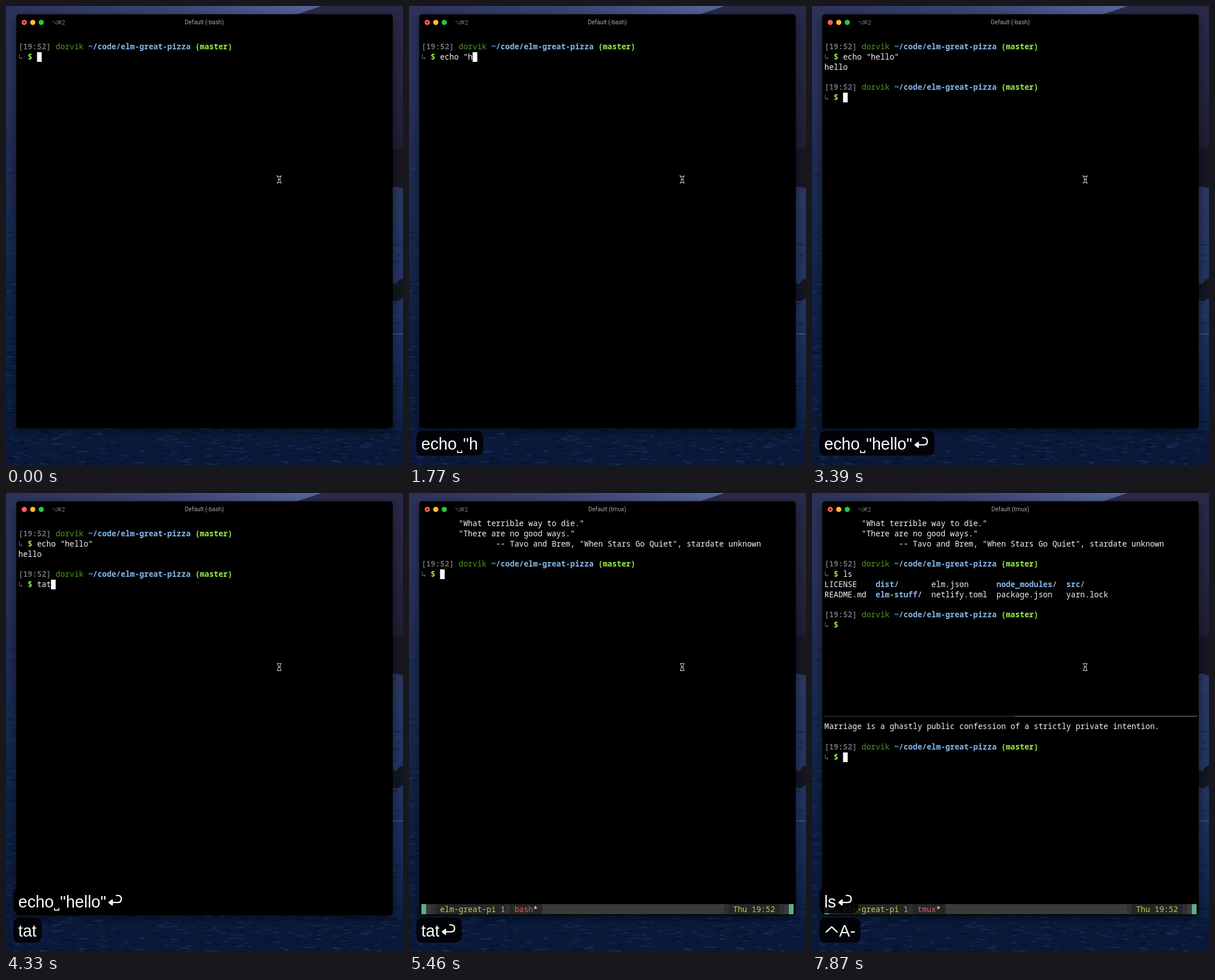
An HTML page with a canvas for the animation above (8 s loop, 696x805 px).

```html
<!DOCTYPE html>
<html lang="en">
<head>
<meta charset="utf-8">
<title>Terminal session</title>
<style>
html, body { margin: 0; width: 100%; height: 100%; overflow: hidden; background: #0a1734; }
canvas { display: block; }
</style>
</head>
<body>
<canvas id="stage" width="696" height="805"></canvas>
<script>
const W = 696, H = 805, LOOP = 8000;
const COL = 8.155, ROW = 17.8, LEFT = 21.8, TOP = 53.5;
const MONO = '"Noto Sans Mono", "DejaVu Sans Mono", monospace';
const KEY_FONT = '28.7px "Liberation Sans", Arial, sans-serif';
const WHITE = '#f4f4f4', GREY = '#6c6c6c', BLUE = '#86b8ea', LIME = '#9aee4a',
      GREEN = '#4e9a1c', YELLOW = '#c9c955', TEAL = '#5faf87';
const ctx = document.getElementById('stage').getContext('2d');

// Key presses, one list per bubble: [time, key]
const keys = [
  [[540, 'e'], [860, 'c'], [980, 'h'], [1090, 'o'], [1210, ' '], [1420, '"'], [1770, 'h'],
   [1890, 'e'], [2000, 'l'], [2120, 'l'], [2360, 'o'], [2590, '"'], [2950, '⏎']],
  [[3740, 't'], [3850, 'a'], [3970, 't'], [4450, '⏎']],
  [[5940, 'l'], [6060, 's'], [6180, '⏎']],
  [[7130, '⌃'], [7130, 'A'], [7480, '-']]
];
const fadeStart = [4740, 6290, Infinity, Infinity];

const typed = (i, t) => keys[i].filter(k => k[0] <= t).map(k => k[1]).join('');
const command = (i, t) => typed(i, t).replace('⏎', '');

function shape(c, points, fill) {
  c.beginPath();
  points.forEach(p => c.lineTo(...p));
  c.closePath();
  c.fillStyle = fill;
  c.fill();
}

function gradient(c, x0, y0, x1, y1, colors) {
  const g = c.createLinearGradient(x0, y0, x1, y1);
  colors.forEach((color, i) => g.addColorStop(i / (colors.length - 1), color));
  return g;
}

function paintDesktop() {
  const layer = document.createElement('canvas');
  layer.width = W;
  layer.height = H;
  const c = layer.getContext('2d');
  let seed = 7;
  const rand = () => (seed = seed * 16807 % 2147483647) / 2147483647;

  c.fillStyle = gradient(c, 0, 0, 0, H,
    ['#2c3259', '#2a315a', '#1e2b54', '#17274e', '#102144', '#0c1c3e', '#0a1838']);
  c.fillRect(0, 0, W, H);
  c.fillStyle = gradient(c, 0, 0, 540, 0, ['#2c3259', '#3a4470', '#56639a']);
  c.fillRect(0, 0, 560, 20);
  c.fillStyle = gradient(c, 0, 300, 0, 745, ['#2b3860', '#263561', '#21335f', '#172b56', '#0e1f45']);
  c.fillRect(670, 300, 26, 445);
  for (let i = 0; i < 1600; i++) {
    const y = 230 + 575 * Math.sqrt(rand()), x = rand() * W - 8;
    c.fillStyle = rand() < .5 ? 'rgba(60,95,165,.2)' : 'rgba(2,7,26,.32)';
    c.beginPath();
    c.ellipse(x, y, 3 + rand() * 7, .7 + rand() * .7, rand() * .4 - .2, 0, 7);
    c.fill();
  }
  shape(c, [[508, 15], [530, 8], [553, 0], [696, 0], [696, 262], [670, 262], [670, 15]],
    gradient(c, 0, 0, 0, 262, ['#282a48', '#24253f', '#1d1d32']));
  shape(c, [[670, 255], [696, 248], [696, 320], [684, 317], [670, 318]], '#171622');
  shape(c, [[670, 482], [684, 488], [690, 480], [696, 478], [696, 512], [686, 518], [670, 514]], '#131521');
  c.fillStyle = 'rgba(110,135,185,.35)';
  c.fillRect(678, 574, 18, 2);

  c.shadowColor = 'rgba(0,0,0,.5)';
  c.shadowBlur = 16;
  c.shadowOffsetY = 5;
  c.fillStyle = '#000';
  c.beginPath();
  c.roundRect(18, 14.5, 660, 726, 5);
  c.fill();
  return layer;
}
const desktop = paintDesktop();

function dot(x, y, r, color) {
  ctx.fillStyle = color;
  ctx.beginPath();
  ctx.arc(x, y, r, 0, 7);
  ctx.fill();
}

function strokePath(path, x, y, width, color = '#fff') {
  ctx.save();
  ctx.translate(x, y);
  ctx.lineWidth = width;
  ctx.lineCap = ctx.lineJoin = 'round';
  ctx.strokeStyle = color;
  ctx.stroke(new Path2D(path));
  ctx.restore();
}

// Text on the terminal's character grid
function put(col, row, text, color = WHITE, bold = false) {
  ctx.font = (bold ? 'bold ' : '') + '13.59px ' + MONO;
  ctx.fillStyle = color;
  [...text].forEach((ch, i) => ctx.fillText(ch, LEFT + (col + i) * COL, TOP + row * ROW + 4.7));
}

function cells(col, row, count, color) {
  ctx.fillStyle = color;
  ctx.fillRect(LEFT + col * COL, TOP + (row - .5) * ROW, count * COL, ROW);
}

function cursor(col, row) {
  ctx.fillStyle = '#fff';
  ctx.fillRect(LEFT + col * COL, Math.round(TOP + row * ROW - 8.4), COL, 17);
}

function prompt(row, text, active) {
  put(0, row, '[19:52]', GREY, true);
  put(8, row, 'dorvik', GREEN);
  put(15, row, '~/code/elm-great-pizza', BLUE, true);
  put(38, row, '(master)', LIME, true);
  put(0, row + 1, '↳', GREY);
  put(2, row + 1, '$', LIME, true);
  put(4, row + 1, text);
  if (active) cursor(4 + text.length, row + 1);
}

function titleBar(t) {
  const tmux = t >= 4740;
  ['#ff5f57', '#febc2e', '#28c840'].forEach((color, i) => dot(32 + i * 14.9, 28.8, 4.6, color));
  if (t < 3390 || tmux) dot(32, 28.8, 1.7, '#750d08');
  ctx.fillStyle = '#7a7a7a';
  ctx.font = '9.3px "DejaVu Sans", sans-serif';
  ctx.fillText('⌥', 80, 32.4);
  ctx.fillText('⌘', 88.7, 32.4);
  ctx.font = '10.4px Roboto, sans-serif';
  ctx.fillText('2', 97.8, 32.5);
  ctx.fillStyle = '#a6a6a6';
  ctx.textAlign = 'center';
  ctx.fillText(tmux ? 'Default (tmux)' : 'Default (-bash)', 347.7, 32.4);
  ctx.textAlign = 'left';
}

function shell(t) {
  prompt(1, command(0, t < 660 ? 0 : t), t < 3030);
  if (t >= 3030) put(0, 3, 'hello');
  if (t >= 3270) prompt(5, command(1, t), true);
  else if (t >= 3030) cursor(0, 4);
}

function statusBar(t) {
  const dark = '#262626', mid = '#303030';
  cells(0, 38, 80, '#3a3a3a');
  [[2, 1, mid], [3, 15, dark], [18, 1, mid], [19, 7, dark], [65, 1, mid], [66, 11, dark], [77, 1, mid],
   [0, 1, TEAL], [79, 1, TEAL]].forEach(([col, count, color]) => cells(col, 38, count, color));
  put(4, 38, 'elm-great-pi', YELLOW);
  put(17, 38, '1', '#ffaf5f');
  put(20, 38, t >= 5460 && t < 7480 ? 'bash' : 'tmux', '#d75f5f');
  put(24, 38, '*');
  put(67, 38, 'Thu 19:52', YELLOW);
}

function listing() {
  const cols = [0, 11, 23, 37, 52];
  ['LICENSE dist/ elm.json node_modules/ src/',
   'README.md elm-stuff/ netlify.toml package.json yarn.lock'].forEach((line, r) =>
    line.split(' ').forEach((name, i) => {
      const folder = name.endsWith('/'), base = name.replace('/', '');
      put(cols[i], 6 + r, base, folder ? BLUE : WHITE, folder);
      if (folder) put(cols[i] + base.length, 6 + r, '/');
    }));
}

function tmux(t) {
  const split = t >= 7480;
  statusBar(t);
  if (t < 4740) return cursor(0, 0);
  put(8, 0, '"What terrible way to die."');
  put(8, 1, '"There are no good ways."');
  put(16, 2, '-- Tavo and Brem, "When Stars Go Quiet", stardate unknown');
  if (t < 4860) return cursor(0, 3);
  prompt(4, command(2, t), t < 6180);
  if (t >= 6180) listing();
  if (t >= 6410) prompt(9, '', !split);
  else if (t >= 6180) cursor(0, 8);
  if (!split) return;
  ctx.fillStyle = '#444';
  ctx.fillRect(21, 391, 335, 1);
  ctx.fillStyle = '#8c8c8c';
  ctx.fillRect(356, 391, 319, 1);
  if (t < 7750) return cursor(0, 20);
  put(0, 20, 'Marriage is a ghastly public confession of a strictly private intention.');
  if (t >= 7870) prompt(22, '', true);
  else cursor(0, 21);
}

// Keys without a letter are drawn: [advance, path, line width]
const signs = {
  ' ': [11, 'M1.4 1.5V4.8H8.8V1.5', 1.7],
  '⏎': [30, 'M5 -8.8L10.5 -13V-4.6ZM5 -8.8H20Q26.5 -8.8 26.5 -15T20 -21H18', 2.3],
  '⌃': [26, 'M3.5 -8.5L13 -17.5L22.5 -8.5', 2.5]
};

function bubble(text, y, alpha) {
  ctx.font = KEY_FONT;
  const advance = ch => signs[ch] ? signs[ch][0] : ctx.measureText(ch).width;
  const width = [...text].reduce((sum, ch) => sum + advance(ch), 0);
  let x = 21.5;
  ctx.globalAlpha = alpha;
  ctx.fillStyle = 'rgba(0,0,0,.87)';
  ctx.beginPath();
  ctx.roundRect(13, y, width + 17.5, 43.5, 10);
  ctx.fill();
  ctx.fillStyle = '#fff';
  for (const ch of text) {
    if (signs[ch]) strokePath(signs[ch][1], x, y + 33.4, signs[ch][2]);
    else ctx.fillText(ch, x, y + 33.4);
    x += advance(ch);
  }
  ctx.globalAlpha = 1;
}

function bubbles(t) {
  keys.forEach((list, i) => {
    const text = typed(i, t), raised = i < 3 && typed(i + 1, t);
    const faded = Math.max(0, Math.floor((t - fadeStart[i]) / 120) + 1) / 4;
    if (text && faded < 1) bubble(text, raised ? 693.5 : 745, 1 - faded);
  });
}

function pointer(t) {
  const late = t >= 4330;
  const path = late
    ? 'M-3.5 -6H3.5L1.5 -2V2L3.5 6.5H-3.5L-1.5 2V-2ZM-1.5 0H1.5'
    : 'M-4 -6.5L0 -5L4 -6.5Q1.5 -4 1.5 -2V2Q1.5 4 4 6.5L0 5L-4 6.5Q-1.5 4 -1.5 2V-2Q-1.5 -4 -4 -6.5M-1.5 0H1.5';
  strokePath(path, 479, late ? 305 : 304.3, 1, '#e4e4e4');
}

function draw(now) {
  const t = now % LOOP;
  ctx.drawImage(desktop, 0, 0);
  titleBar(t);
  (t < 4450 ? shell : tmux)(t);
  pointer(t);
  bubbles(t);
}

const start = performance.now();
function tick() {
  draw(performance.now() - start);
  requestAnimationFrame(tick);
}
tick();
</script>
</body>
</html>
```
